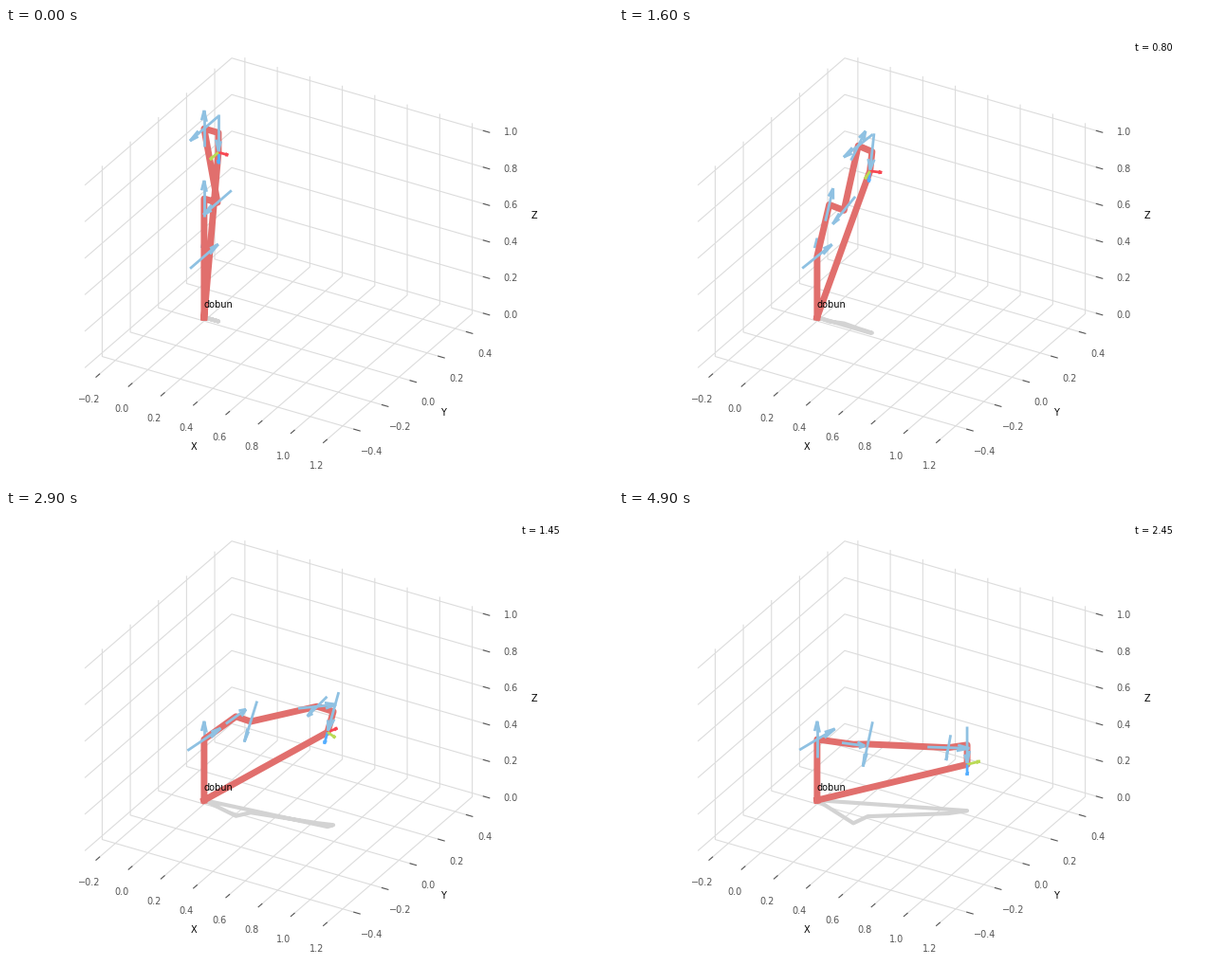
These frames come from a looping animation (640x480 px, 5 s). A matplotlib script:

```python
import numpy as np
import matplotlib.pyplot as plt
from matplotlib.animation import FuncAnimation
from matplotlib.collections import LineCollection

W, H, DPI = 640, 480, 100
FRAMES, INTERVAL, DT = 50, 100, 0.05

plt.rcParams["font.family"] = "DejaVu Sans"
plt.rcParams["font.size"] = 7

GRID, TICK = "#dcdcdc", "#555555"
ARM, SHADOW, AXIS = "#E16F6D", "lightgrey", "#8FC1E2"
TOOL = ("#F84752", "#BADA55", "#54AEFF")

# Orthographic view: elevation 30, azimuth -60, box proportions 4:4:3
UNIT = 74.132
CENTRE = np.array([294.486, 233.51])
BOX = np.array([4 / 1.5, 4, 3])
MIDDLE = np.array([0.5, 0, 0.5])
S3 = np.sqrt(3)
RIGHT = np.array([S3 / 2, 0.5, 0])
DOWN = np.array([0.25, -S3 / 4, -S3 / 2])
TOWARD = np.array([S3 / 4, -0.75, 0.5])

# Axis limits with the small pane margin
SPAN = np.array([1.5, 1.0, 1.0])
LOW = np.array([-0.25, -0.5, 0]) - SPAN / 48
HIGH = np.array([1.25, 0.5, 1]) + SPAN / 48

# Arm geometry: link length, twist in quarter turns, offset
LINKS = [(0, 0, 0.333), (0, -1, 0), (0, 1, 0.316), (0.0825, 1, 0),
         (-0.0825, -1, 0.384), (0, 1, 0), (0.088, 1, 0)]
FLANGE = 0.107
Q_END = np.array([-0.2599, 1.2528, 1.0920, -1.0007, -1.0352, 1.7725, -1.749])


def project(points):
    """World coordinates to pixels, y downwards."""
    p = (np.asarray(points, float) - MIDDLE) * BOX
    return CENTRE + UNIT * np.stack([p @ RIGHT, p @ DOWN], axis=-1)


def rot_x(quarters):
    c, s = round(np.cos(quarters * np.pi / 2)), round(np.sin(quarters * np.pi / 2))
    return np.array([[1, 0, 0], [0, c, -s], [0, s, c]], float)


def rot_z(angle):
    c, s = np.cos(angle), np.sin(angle)
    return np.array([[c, -s, 0], [s, c, 0], [0, 0, 1]])


def joint_poses(q):
    rot, pos, poses = np.eye(3), np.zeros(3), []
    for (a, twist, d), angle in zip(LINKS, q):
        pos = pos + rot[:, 0] * a
        rot = rot @ rot_x(twist) @ rot_z(angle)
        pos = pos + rot[:, 2] * d
        poses.append((rot, pos))
    poses.append((rot, pos + rot[:, 2] * FLANGE))
    return poses


def arrow(tail, vec):
    """Shaft and two head strokes as three segments."""
    tip = tail + vec
    flat = np.hypot(vec[0], vec[1])
    x, y = (vec[1] / flat, -vec[0] / flat) if flat > 1e-9 else (0, 1)
    c, s = np.cos(np.radians(15)), np.sin(np.radians(15))
    turn = np.array([[c + x * x * (1 - c), x * y * (1 - c), y * s],
                     [x * y * (1 - c), c + y * y * (1 - c), -x * s],
                     [-y * s, x * s, c]])
    return np.array([[tail, tip],
                     [tip - 0.3 * turn @ vec, tip],
                     [tip - 0.3 * turn.T @ vec, tip]])


fig = plt.figure(figsize=(W / DPI, H / DPI), dpi=DPI, facecolor="white")
ax = fig.add_axes([0, 0, 1, 1])
ax.set_xlim(0, W)
ax.set_ylim(H, 0)
ax.axis("off")


def stroke(points, color, width, zorder):
    u, v = project(points).T
    return ax.plot(u, v, color=color, lw=width, zorder=zorder)[0]


def draw_axis(axis, ticks, edge, out, tick_dir, name):
    """Ticks, numbers and name along one edge of the box."""
    out = np.array(out) * SPAN / 12
    along = np.eye(3)[tick_dir] * out
    for value in ticks:
        pos = np.array(edge, float)
        pos[axis] = value
        stroke([pos - 0.1 * along, pos + 0.2 * along], TICK, 0.8, 0.6)
        u, v = project(pos + 0.7986 * out)
        label = f"{value:.1f}".replace("-", "\u2212")
        ax.text(u, v, label, color=TICK, ha="center", va="top")
    pos = np.array(edge, float)
    pos[axis] = MIDDLE[axis]
    u, v = project(pos + 1.528 * out)
    ax.text(u, v, name, color="black", ha="center", va="center")


x_ticks = np.arange(-1, 7) / 5
y_ticks = np.arange(-2, 3) / 5
z_ticks = np.arange(0, 6) / 5
(x0, y0, z0), (x1, y1, z1) = LOW, HIGH

for x in x_ticks:
    stroke([(x, y1, z1), (x, y1, z0), (x, y0, z0)], GRID, 0.8, 0.5)
for y in y_ticks:
    stroke([(x0, y, z1), (x0, y, z0), (x1, y, z0)], GRID, 0.8, 0.5)
for z in z_ticks:
    stroke([(x0, y0, z), (x0, y1, z), (x1, y1, z)], GRID, 0.8, 0.5)

draw_axis(0, x_ticks + 0.0, (0, y0, z0), (0, -1, -1), 1, "X")
draw_axis(1, y_ticks + 0.0, (x1, 0, z0), (1, 0, -1), 0, "Y")
draw_axis(2, z_ticks + 0.0, (x1, y1, 0), (1, 1, 0), 0, "Z")

shadow = stroke(np.zeros((2, 3)), SHADOW, 3, 2)
arm = stroke(np.zeros((2, 3)), ARM, 5, 2)
arrows = [ax.add_collection(LineCollection([], colors=color, linewidths=2),
                            autolim=False)
          for color in (AXIS,) * len(LINKS) + TOOL]
ax.text(*project((0, 0, 0.05)), "dobun", color="black", zorder=3)
timer = fig.text(0.85, 0.95, "", color="black")


def update(i):
    s = i / (FRAMES - 1)
    poses = joint_poses(Q_END * s**3 * (10 - 15 * s + 6 * s * s))

    path = np.array([np.zeros(3), *(pos for _, pos in poses), np.zeros(3)])
    arm.set_data(*project(path).T)
    shadow.set_data(*project(path * [1, 1, 0]).T)

    shapes = [arrow(pos - 0.1 * rot[:, 2], 0.2 * rot[:, 2])
              for rot, pos in poses[:-1]]
    rot, pos = poses[-1]
    shapes += [arrow(pos, 0.06 * rot[:, k]) for k in range(3)]

    # The farthest arrow falls behind the arm, the others in front of it
    nearness = [np.max((shape * BOX) @ TOWARD) for shape in shapes]
    for rank, k in enumerate(np.argsort(nearness, kind="stable")):
        arrows[k].set_segments(project(shapes[k]))
        arrows[k].set_zorder(1.5 + rank)

    timer.set_text(f"t = {i * DT:.2f}" if i else "")
    return [arm, shadow, timer, *arrows]


anim = FuncAnimation(fig, update, frames=FRAMES, interval=INTERVAL,
                     repeat=True, repeat_delay=0, blit=False)
plt.show()
```
